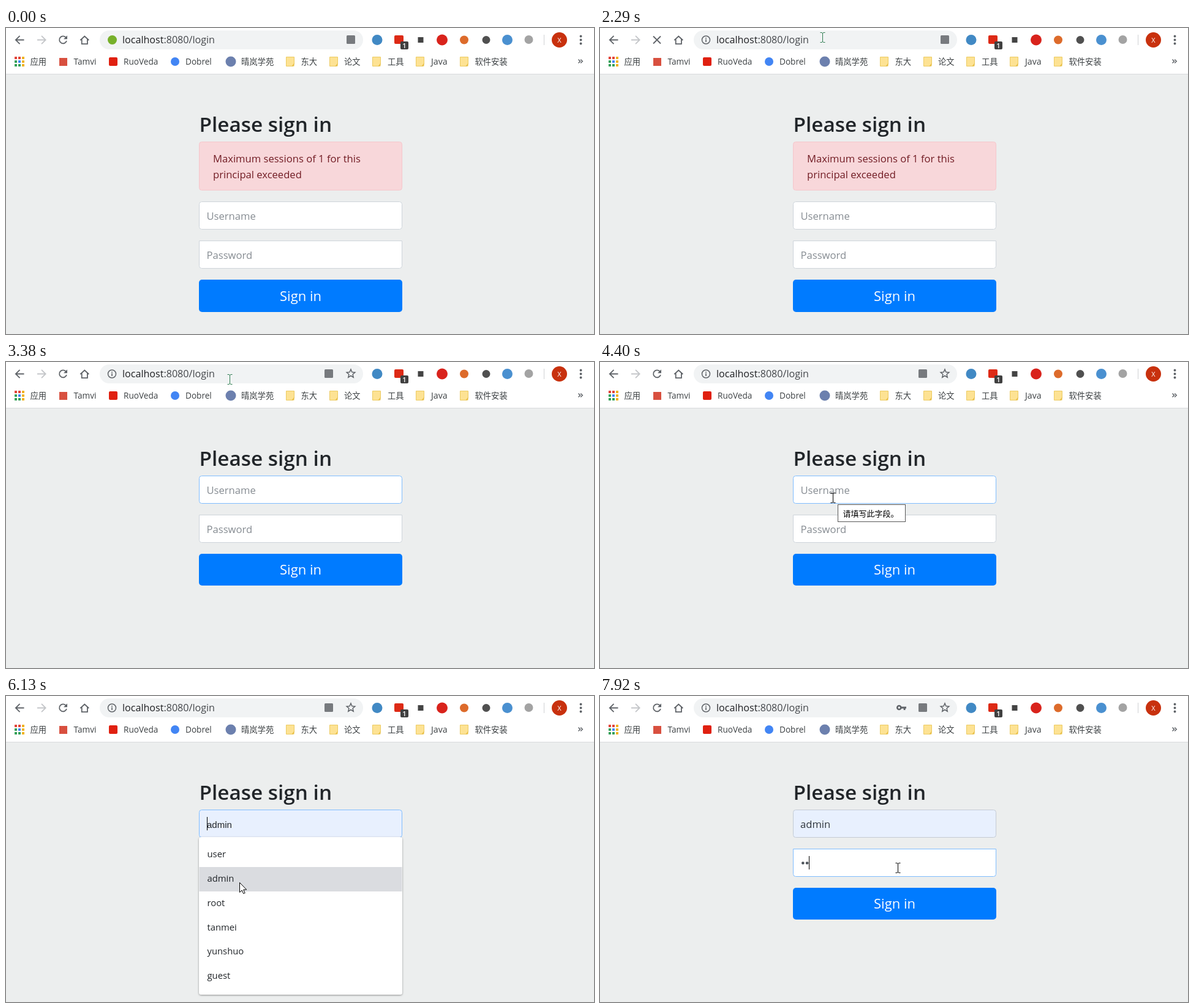
An HTML page that plays this animation: 960x501 px, repeating every 8000 ms.

```html
<!DOCTYPE html>
<html lang="zh">
<head>
<meta charset="utf-8">
<title>Please sign in</title>
<style>
html, body { margin: 0; width: 100%; height: 100%; overflow: hidden; background: #eceeee; }
svg { display: block; width: 960px; height: 501px; font-family: "Open Sans", "Noto Sans CJK SC", "Noto Sans CJK", sans-serif; }
.line { fill: none; stroke: #5f6368; stroke-width: 1.8; }
.thin { stroke-width: 1.5; }
.mark text { font-size: 13.6px; fill: #3c4043; }
.mark .zh { font-size: 13.3px; }
.url { font-size: 16.1px; }
.hint { font-size: 16.6px; fill: #868c92; }
.field { fill: #fff; stroke: #ced4da; }
.body { font-size: 16.6px; }
.list { font-size: 14.8px; fill: #212529; }
.preview { font: 15px "Liberation Sans", Arial, sans-serif; fill: #212529; }
.mid { text-anchor: middle; }

/* Every timed part shares one 8 s clock and changes in hard steps. */
.t { animation: 8s step-end infinite; }

/* browser bar */
.reload { animation-name: reload; }
.stop { animation-name: stop; }
.favicon { animation-name: favicon; }
.info { animation-name: info; }
.focus { animation-name: focus; }
.trans { animation-name: trans; }
.star { animation-name: star; }
.badge { animation-name: badge; }
.key { animation-name: key; }
@keyframes reload { 28.625% { opacity: 0 } 38.5% { opacity: 1 } }
@keyframes stop { 0% { opacity: 0 } 28.625% { opacity: 1 } 38.5%, to { opacity: 0 } }
@keyframes favicon { 28.625%, to { opacity: 0 } }
@keyframes info { 0% { opacity: 0 } 28.625% { opacity: 1 } }
@keyframes focus { 0% { opacity: 0 } 15% { opacity: 1 } 28.625%, to { opacity: 0 } }
@keyframes trans {
  30.625% { opacity: 0; transform: translateX(-36px) }
  31.5%, to { opacity: 1; transform: translateX(-36px) }
}
@keyframes star { 0% { opacity: 0 } 30.625% { opacity: 1 } }
@keyframes badge { 30.625% { opacity: 0 } 32.5% { opacity: 1 } }
@keyframes key { 0% { opacity: 0 } 97.125% { opacity: 1 } }

/* page */
.before { animation-name: before; }
.after { animation-name: after; }
.plain { animation-name: plain; }
.styled { animation-name: styled; }
.user { animation-name: user; }
.pass { animation-name: pass; }
.userhint { animation-name: userhint; }
.try1 { animation-name: try1; }
.try2 { animation-name: try2; }
.filled { animation-name: filled; }
.passhint { animation-name: passhint; }
.dot1 { animation-name: key; }
.dot2 { animation-name: dot2; }
.caret1 { animation-name: caret1; }
.caret2 { animation-name: caret2; }
.tip { animation-name: tip; }
.menu { animation-name: menu; }
.row { animation-name: row; }
@keyframes before { 35.375%, to { opacity: 0 } }
@keyframes after { 0% { opacity: 0 } 35.375% { opacity: 1 } }
@keyframes plain { 36.5%, to { opacity: 0 } }
@keyframes styled { 0% { opacity: 0 } 36.5% { opacity: .6 } 37.5% { opacity: 1 } }
@keyframes user {
  0% { stroke: #333; fill: #fff }
  36.5% { stroke: #7994ae }
  37.5% { stroke: #80bdff }
  73.625% { fill: #e8f0fe }
  82.5% { stroke: #c4cbd4 }
  to { stroke: #c4cbd4; fill: #e8f0fe }
}
@keyframes pass {
  0% { stroke: #333 }
  36.5% { stroke: #85898d }
  37.5% { stroke: #ced4da }
  82.5%, to { stroke: #80bdff }
}
@keyframes userhint { 73.625%, to { opacity: 0 } }
@keyframes try1 { 0% { opacity: 0 } 73.625% { opacity: 1 } 75.625%, to { opacity: 0 } }
@keyframes try2 { 0% { opacity: 0 } 75.625% { opacity: 1 } 79.5%, to { opacity: 0 } }
@keyframes filled { 0% { opacity: 0 } 79.5% { opacity: 1 } }
@keyframes passhint { 97.125%, to { opacity: 0 } }
@keyframes dot2 { 0% { opacity: 0 } 99% { opacity: 1 } }
@keyframes caret1 {
  0% { opacity: 0; transform: none }
  37.5% { opacity: 1 }
  42.25% { opacity: 0 }
  48.375% { opacity: 1 }
  55% { opacity: 0 }
  62.125% { opacity: 1 }
  79.5% { transform: translateX(49px) }
  82.5%, to { opacity: 0 }
}
@keyframes caret2 {
  0% { opacity: 0; transform: none }
  82.5% { opacity: 1 }
  89.375% { opacity: 0 }
  96.125% { opacity: 1 }
  97.125% { transform: translateX(6.5px) }
  99%, to { opacity: 1; transform: translateX(13px) }
}
@keyframes tip { 0% { opacity: 0 } 50.375% { opacity: .5 } 51.375% { opacity: 1 } 66.875%, to { opacity: 0 } }
@keyframes menu { 0% { opacity: 0 } 66.875% { opacity: .6 } 67.875% { opacity: 1 } 79.5%, to { opacity: 0 } }
@keyframes row {
  0% { opacity: 0; transform: none }
  73.625% { opacity: 1 }
  75.625%, to { opacity: 1; transform: translateY(40px) }
}

/* pointer */
.pointer { animation-name: path; }
.arrow { animation-name: arrow; }
.beam { animation-name: beam; }
@keyframes path {
  0% { transform: translate(817px, 354px) }
  1.625% { transform: translate(770px, 210px) }
  2.5% { transform: translate(803px, 233px) }
  4.625% { transform: translate(720px, 150px) }
  5.625% { transform: translate(600px, 90px) }
  6.5% { transform: translate(440px, 45px) }
  7.5% { transform: translate(300px, 38px) }
  8.5% { transform: translate(200px, 16px) }
  9.375% { transform: translate(168px, 15px) }
  10.375% { transform: translate(290px, 15px) }
  11.25% { transform: translate(363px, 15px) }
  42.25% { transform: translate(365px, 28px) }
  43.25% { transform: translate(370px, 60px) }
  44.25% { transform: translate(376px, 100px) }
  45.25% { transform: translate(380px, 140px) }
  46.25% { transform: translate(382px, 168px) }
  47.25% { transform: translate(383px, 194px) }
  48.375% { transform: translate(382px, 207px) }
  49.375% { transform: translate(381px, 216px) }
  50.375% { transform: translate(380px, 222px) }
  58.25% { transform: translate(392px, 221px) }
  59% { transform: translate(400px, 220px) }
  62.125% { transform: translate(385px, 217px) }
  63.125% { transform: translate(368px, 212px) }
  64% { transform: translate(354px, 208px) }
  65% { transform: translate(348px, 206px) }
  72.75% { transform: translate(353px, 224px) }
  73.625% { transform: translate(362px, 252px) }
  74.625% { transform: translate(371px, 275px) }
  75.625% { transform: translate(378px, 296px) }
  76.625% { transform: translate(381px, 305px) }
  80.5% { transform: translate(410px, 298px) }
  81.5% { transform: translate(450px, 287px) }
  82.5% { transform: translate(478px, 282px) }
  83.5%, to { transform: translate(486px, 281px) }
}
@keyframes arrow {
  0% { opacity: 0 }
  .875% { opacity: 1 }
  8.5% { opacity: 0 }
  43.25% { opacity: 1 }
  47.25% { opacity: 0 }
  73.625% { opacity: 1 }
  81.5%, to { opacity: 0 }
}
@keyframes beam {
  0% { opacity: 0; stroke: #2f7d52 }
  8.5% { opacity: 1 }
  43.25% { opacity: 0; stroke: #000 }
  47.25% { opacity: 1 }
  73.625% { opacity: 0 }
  81.5%, to { opacity: 1; stroke: #000 }
}
</style>
</head>
<body>
<svg viewBox="0 0 960 501">
  <defs>
    <g id="folder">
      <path d="M.5 .5h13v11l-2 4H.5z" fill="#fde293" stroke="#eccb62"/>
      <path d="M13.5 10.5v5h-4z" fill="#e8bf45"/>
    </g>
    <filter id="shade" x="-5%" y="-5%" width="110%" height="112%">
      <feDropShadow dx="0" dy="1" stdDeviation="1.5" flood-opacity=".4"/>
    </filter>
  </defs>

  <rect width="960" height="501" fill="#eceeee"/>
  <rect width="960" height="75" fill="#fff"/>
  <rect y="75" width="960" height="1" fill="#d9dbdd"/>

  <!-- navigation -->
  <path class="line" d="M29.5 19.5H16M22.5 12.8L15.8 19.5L22.5 26.2"/>
  <path class="line" d="M51 19.5H64.5M58 12.8L64.7 19.5L58 26.2" style="stroke:#c4c6c9"/>
  <g class="t reload">
    <path class="line" d="M98 15.8A6 6 0 1 0 98.9 21"/>
    <path d="M100 12.2v6h-6z" fill="#5f6368"/>
  </g>
  <path class="line t stop" d="M87 13.5l12 12m0-12l-12 12"/>
  <path class="line" d="M121.3 20l7-6.5 7 6.5M123.7 18.5v7.7h9.2v-7.7"/>

  <!-- address -->
  <rect x="153" y="4" width="430" height="31" rx="15.5" fill="#f1f3f4"/>
  <text class="url" x="190" y="25" fill="#44474b"><tspan fill="#202124">localhost</tspan>:8080/login</text>
  <g class="t focus">
    <rect x="153" y="4" width="430" height="31.5" rx="15.7" fill="#fff" stroke="#a9c9fb" stroke-width="2.2"/>
    <rect x="191" y="8" width="151" height="23" fill="#0078d7"/>
    <text class="url" x="190" y="25" fill="#fff">localhost:8080/login</text>
  </g>
  <circle class="t favicon" cx="173.5" cy="19.5" r="7.5" fill="#77b02a"/>
  <g class="t info">
    <circle class="line thin" cx="173" cy="19.5" r="6.5"/>
    <path d="M172.2 18.5h1.6v4.5h-1.6zM172.2 15.7h1.6v1.7h-1.6z" fill="#5f6368"/>
  </g>
  <rect class="t trans" x="556" y="12" width="14" height="14" rx="1.5" fill="#777a7e"/>
  <path class="line thin t star" d="M563 12l1.9 4.6 4.9 .4-3.7 3.2 1.1 4.9-4.2-2.6-4.2 2.6 1.1-4.9-3.7-3.2 4.9-.4z"/>
  <g class="t key">
    <circle class="line" cx="488.3" cy="19" r="3" style="stroke-width:2.6"/>
    <path d="M491 17.6h9v2.8h-1.5v2.6h-2.8v-2.6H491z" fill="#5f6368"/>
  </g>

  <!-- extensions -->
  <circle cx="606" cy="19.5" r="8.5" fill="#4189c4"/>
  <rect x="634" y="12" width="15" height="14" rx="2" fill="#dd2a15"/>
  <g class="t badge">
    <rect x="644" y="22" width="13" height="13" rx="2" fill="#404040"/>
    <text class="mid" x="650.5" y="32.5" font-size="11" font-weight="600" fill="#fff">1</text>
  </g>
  <rect x="672.5" y="15" width="9" height="9" fill="#444"/>
  <circle cx="712" cy="19.5" r="9" fill="#d9231c"/>
  <circle cx="748" cy="19.5" r="7" fill="#dd6b2b"/>
  <circle cx="784" cy="19.5" r="6.5" fill="#505050"/>
  <circle cx="818.5" cy="19.5" r="8.5" fill="#4a90d0"/>
  <circle cx="853.5" cy="19" r="7" fill="#a3a3a3"/>
  <rect x="878" y="11" width="1" height="17" fill="#d0d2d4"/>
  <circle cx="903.5" cy="19.5" r="12.5" fill="#c8310e"/>
  <text class="mid" x="903.5" y="23.5" font-size="11" fill="#fff">X</text>
  <g fill="#5f6368">
    <circle cx="938.5" cy="13.5" r="1.9"/><circle cx="938.5" cy="19.5" r="1.9"/><circle cx="938.5" cy="25.5" r="1.9"/>
  </g>

  <!-- bookmarks -->
  <g class="mark">
    <path d="M14 47h4v4h-4zM20 47h4v4h-4z" fill="#e2453a"/>
    <path d="M26 47h4v4h-4zM26 53h4v4h-4zM26 59h4v4h-4z" fill="#f0b323"/>
    <path d="M14 53h4v4h-4zM14 59h4v4h-4zM20 59h4v4h-4z" fill="#34a058"/>
    <path d="M20 53h4v4h-4z" fill="#4285f4"/>
    <text class="zh" x="39.5" y="60">应用</text>
    <rect x="87" y="49" width="13" height="13" fill="#d8503f"/>
    <text x="110.5" y="60">Tamvi</text>
    <rect x="168" y="48" width="14" height="14" rx="2" fill="#e02010"/>
    <text x="192" y="60">RuoVeda</text>
    <circle cx="276" cy="55" r="7" fill="#4285f4"/>
    <text x="293" y="60">Dobrel</text>
    <circle cx="367" cy="55" r="8.5" fill="#6c80ae"/>
    <text class="zh" x="384" y="60">晴岚学苑</text>
    <use href="#folder" x="457" y="47"/><text class="zh" x="481.5" y="60">东大</text>
    <use href="#folder" x="528" y="47"/><text class="zh" x="552" y="60">论文</text>
    <use href="#folder" x="598" y="47"/><text class="zh" x="623" y="60">工具</text>
    <use href="#folder" x="669" y="47"/><text x="694" y="60" style="font-size:14.2px">Java</text>
    <use href="#folder" x="741" y="47"/><text class="zh" x="765.5" y="60">软件安装</text>
    <path class="line thin" d="M934.5 51.5l3 3-3 3m3.7-6l3 3-3 3"/>
  </g>

  <text x="315.5" y="170" font-size="33.3" font-weight="600" fill="#212529">Please sign in</text>

  <!-- form with the warning -->
  <g class="t before">
    <rect x="315.5" y="186.5" width="331" height="79" rx="4" fill="#f8d7da" stroke="#f5c6cb"/>
    <text class="body" fill="#721c24"><tspan x="338" y="220">Maximum sessions of 1 for this</tspan><tspan x="338" y="246">principal exceeded</tspan></text>
    <rect class="field" x="315.5" y="284.5" width="331" height="45" rx="4"/>
    <text class="hint" x="327.5" y="314">Username</text>
    <path class="field" d="M315.5 348.5h331v41q0 4-4 4h-323q-4 0-4-4z"/>
    <text class="hint" x="327.5" y="378">Password</text>
    <rect x="315" y="412" width="332" height="53" rx="5" fill="#007bff"/>
    <text class="mid" x="481" y="447" font-size="22" fill="#fff">Sign in</text>
  </g>

  <!-- fresh form -->
  <g class="t after">
    <rect class="field t user" x="315.5" y="186.5" width="331" height="45" rx="4"/>
    <text class="hint t userhint" x="327.5" y="216">Username</text>
    <text class="preview t try1" x="328" y="216">user</text>
    <text class="preview t try2" x="328" y="216">admin</text>
    <text class="body t filled" x="327" y="216" fill="#30363c">admin</text>
    <rect class="t caret1" x="328" y="198" width="1" height="22"/>

    <path class="field t pass" d="M315.5 250.5h331v41q0 4-4 4h-323q-4 0-4-4z"/>
    <text class="hint t passhint" x="327.5" y="280">Password</text>
    <circle class="t dot1" cx="331.3" cy="273.5" r="2.3" fill="#495057"/>
    <circle class="t dot2" cx="338.1" cy="273.5" r="2.3" fill="#495057"/>
    <rect class="t caret2" x="328" y="262" width="1" height="22"/>

    <g class="t plain">
      <rect x="315" y="314" width="332" height="28" rx="5" fill="#eff0f0"/>
      <text class="mid" x="481" y="334" font-size="14.8" fill="#212529">Sign in</text>
    </g>
    <g class="t styled">
      <rect x="315" y="314" width="332" height="52" rx="5" fill="#007bff"/>
      <text class="mid" x="481" y="348" font-size="22" fill="#fff">Sign in</text>
    </g>

    <g class="t tip">
      <rect x="388.5" y="233.5" width="110" height="28" fill="#fff" stroke="#575757"/>
      <text x="396.5" y="253" font-size="13">请填写此字段。</text>
    </g>

    <g class="t menu">
      <rect x="315" y="231" width="332" height="258" rx="4" fill="#fff" filter="url(#shade)"/>
      <rect class="t row" x="315.5" y="240" width="331" height="40" fill="#dadce0"/>
      <g class="list">
        <text x="328.5" y="264">user</text>
        <text x="328.5" y="304">admin</text>
        <text x="328.5" y="344">root</text>
        <text x="328.5" y="384">tanmei</text>
        <text x="328.5" y="423">yunshuo</text>
        <text x="328.5" y="463">guest</text>
      </g>
    </g>
  </g>

  <g class="t pointer">
    <path class="t arrow" d="M.5 .5v16l3.7-3.5 2.5 5.6 2.5-1.1-2.5-5.5h5z" fill="#fff" stroke="#000"/>
    <path class="t beam" d="M-3.5-7.5H-1L.5-6.5L2-7.5H4.5M.5-7V8M-3.5 8.5H-1L.5 7.5L2 8.5H4.5" fill="none"/>
  </g>
</svg>
</body>
</html>
```
